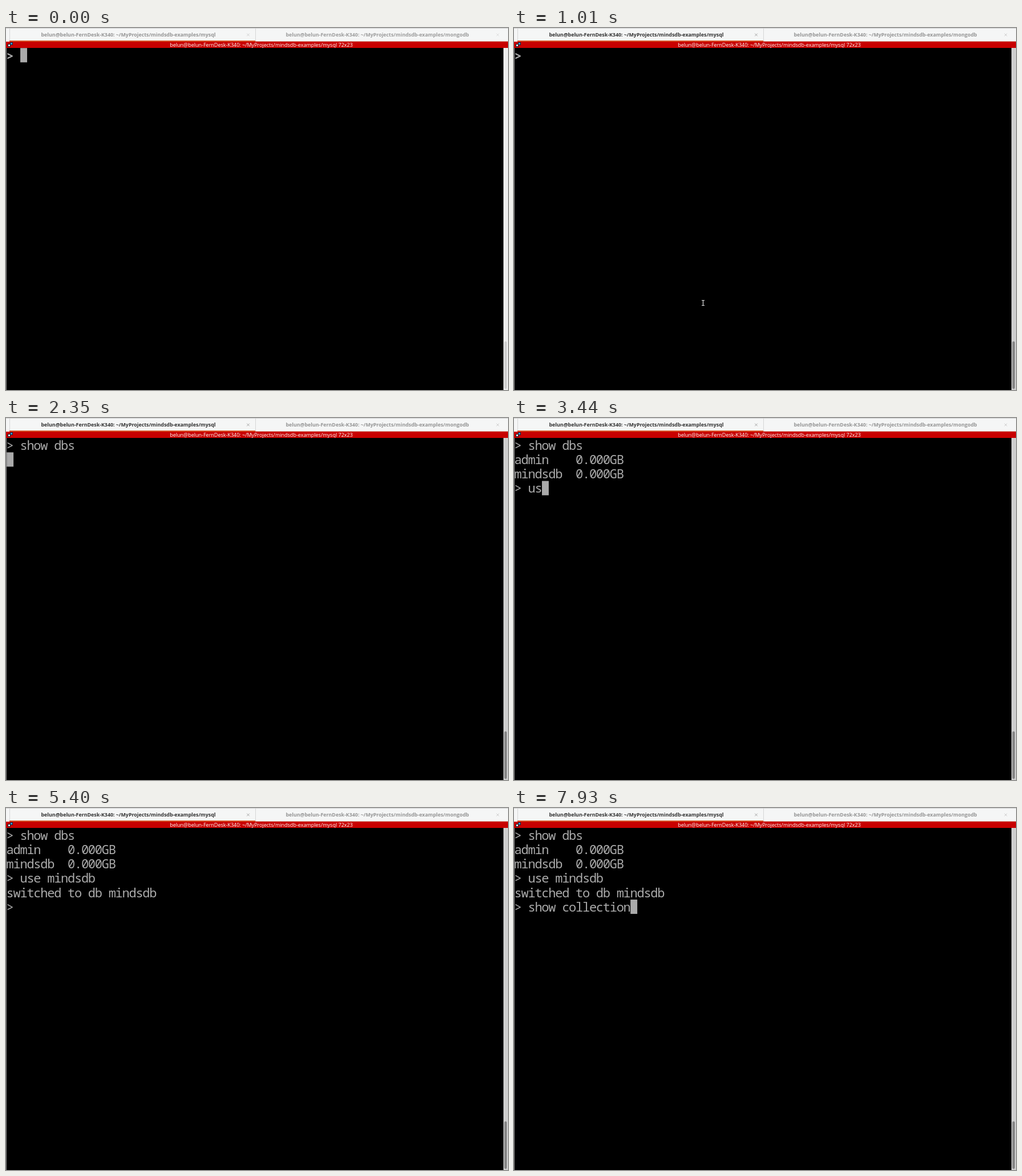
Write an HTML page with a canvas that moves like this. It is 880 px wide and 636 px high and loops after 8 s.

```html
<!DOCTYPE html>
<html lang="en">
<head>
<meta charset="utf-8">
<title>Terminal session</title>
<style>
  html, body { margin: 0; width: 100%; height: 100%; overflow: hidden; background: #000; }
  canvas { display: block; width: 880px; height: 636px; }
</style>
</head>
<body>
<canvas id="stage" width="880" height="636"></canvas>
<script>
const ctx = document.getElementById('stage').getContext('2d');
const LOOP = 8000;
const CELL = 11.94, ROW = 25.14, LEFT = 1.2, TOP = 35.2;
const FONT_SIZE = 22;
const HOST = 'belun@belun-FernDesk-K340: ~/MyProjects/mindsdb-examples/';

// Each command: its row, key times, time of Enter, and the reply that follows.
const COMMANDS = [
  { row: 0, start: 0, text: 'show dbs', enter: 2350, replyAt: 2620,
    keys: [1130, 1290, 1480, 1580, 1770, 1870, 2070, 2160],
    reply: ['admin    0.000GB', 'mindsdb  0.000GB'] },
  { row: 3, start: 2620, text: 'use mindsdb', enter: 4790, replyAt: 4790,
    keys: [3390, 3440, 3640, 3730, 3830, 3920, 4160, 4240, 4320, 4400, 4610],
    reply: ['switched to db mindsdb'] },
  { row: 5, start: 4790, text: 'show collection', enter: Infinity, replyAt: Infinity,
    keys: [5990, 6090, 6280, 6380, 6480, 6770, 6860, 7070, 7160, 7260, 7350, 7550, 7640, 7860, 7930],
    reply: [] }
];
const CURSOR_OFF = [[1010, 1130], [2950, 3390], [5400, 5990]];
const FOCUS_STEPS = [270, 350, 430, 510];
const POINTER_HIDE = 1130;

const passed = (times, t) => times.filter(time => t >= time).length;

function rect(color, x, y, w, h) {
  ctx.fillStyle = color;
  ctx.fillRect(x, y, w, h);
}

function grey(from, to, k) {
  const v = Math.round(from + (to - from) * k);
  return `rgb(${v},${v},${v})`;
}

function label(text, x, y, font, color) {
  ctx.font = font;
  ctx.letterSpacing = '0px';
  ctx.textAlign = 'center';
  ctx.fillStyle = color;
  ctx.fillText(text, x, y);
}

function line(text, row, weight = 400) {
  ctx.font = `${weight} ${FONT_SIZE}px "Noto Sans Mono", monospace`;
  const spacing = CELL - FONT_SIZE * 0.6;
  ctx.letterSpacing = spacing + 'px';
  ctx.textAlign = 'left';
  ctx.fillStyle = '#aaa';
  ctx.fillText(text, LEFT + spacing / 2, TOP + row * ROW + (weight > 400 ? 21.5 : 20.8));
}

function closeMark(x, color) {
  ctx.strokeStyle = color;
  ctx.lineWidth = 1;
  ctx.beginPath();
  ctx.moveTo(x - 2.3, 9.7); ctx.lineTo(x + 2.3, 14.3);
  ctx.moveTo(x + 2.3, 9.7); ctx.lineTo(x - 2.3, 14.3);
  ctx.stroke();
}

function drawWindow(focus) {
  rect('#000', 0, 0, 880, 636);
  rect('#f5f6f6', 0, 0, 880, 24);
  rect('#cfcfcf', 0, 0, 880, 1);
  rect('#d6d6d6', 6, 1, 1, 22);
  rect('#d6d6d6', 437, 1, 1, 22);
  rect('#d8a090', 437, 23, 443, 1);
  rect('#d9572b', 6, 22, 431, 2);

  const tabFont = 'bold 8.85px "Open Sans", sans-serif';
  label(HOST + 'mysql', 214.5, 15, tabFont, grey(148, 48, focus));
  label(HOST + 'mongodb', 651, 15, tabFont, grey(155, 148, focus));
  closeMark(424.5, grey(208, 165, focus));
  closeMark(862, grey(222, 205, focus));

  rect('#c80000', 0, 24, 880, 11);
  label(HOST + 'mysql 72x23', 447.5, 32.6, '9px "Open Sans", sans-serif', '#fff');
  rect('#102030', 7, 25, 5, 5);
  rect('#3d8fd0', 8, 26, 3, 3);
  rect('#102030', 3, 28, 5, 5);
  rect('#e8e8e8', 4, 29, 3, 3);

  rect('#8a8a8a', 0, 35, 1, 601);
  rect(grey(238, 206, focus), 872, 35, 8, 601);
  ctx.fillStyle = grey(206, 132, focus);
  ctx.beginPath();
  ctx.roundRect(873.5, 550.5, 4.5, 83.5, 2.2);
  ctx.fill();
}

function drawSession(t) {
  let cursor;
  for (const c of COMMANDS) {
    if (t < c.start) break;
    const count = passed(c.keys, t);
    const entered = t >= c.enter;
    if (c.row === 0 && !entered) {
      line('>', 0, 700);
      line('  ' + c.text.slice(0, count), 0);
    } else {
      line('> ' + c.text.slice(0, count), c.row);
    }
    if (t >= c.replyAt) c.reply.forEach((text, i) => line(text, c.row + 1 + i));
    cursor = entered ? { col: 0, row: c.row + 1 } : { col: count + 2, row: c.row };
  }
  if (!CURSOR_OFF.some(([from, to]) => t >= from && t < to)) {
    rect('#aaa', LEFT + cursor.col * CELL, TOP + cursor.row * ROW, CELL, ROW);
  }
}

function drawPointer(t, focus) {
  if (t < 130 || t >= POINTER_HIDE) return;
  const x = 331.5 + 10 * (1 - focus), y = 483 + 30 * (1 - focus);
  for (const [color, width] of [['#000', 3], ['#ddd', 1.2]]) {
    ctx.strokeStyle = color;
    ctx.lineWidth = width;
    ctx.beginPath();
    ctx.moveTo(x, y - 4.5); ctx.lineTo(x, y + 4.5);
    ctx.moveTo(x - 2.5, y - 4.5); ctx.lineTo(x + 2.5, y - 4.5);
    ctx.moveTo(x - 2.5, y + 4.5); ctx.lineTo(x + 2.5, y + 4.5);
    ctx.stroke();
  }
}

const began = performance.now();
function frame() {
  const t = (performance.now() - began) % LOOP;
  const focus = passed(FOCUS_STEPS, t) / FOCUS_STEPS.length;
  drawWindow(focus);
  drawSession(t);
  drawPointer(t, focus);
  requestAnimationFrame(frame);
}
frame();
</script>
</body>
</html>
```
